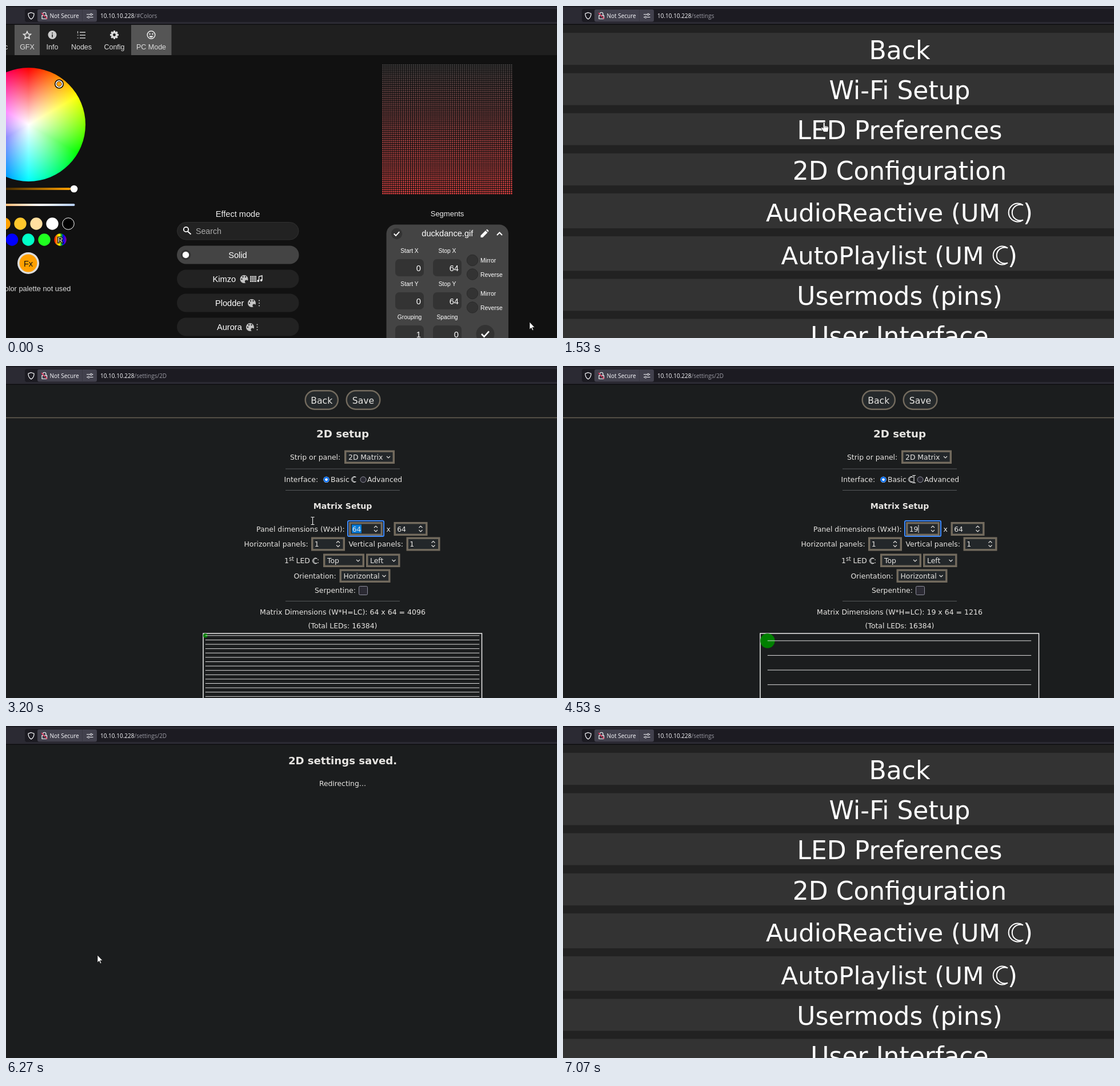
Animation, 964 px wide and 581 px high, one loop 7.34 s. Source, as an HTML page:

```html
<!DOCTYPE html>
<html lang="en">
<head>
<meta charset="utf-8">
<title>Matrix settings</title>
<style>
html, body { margin: 0; width: 100%; height: 100%; overflow: hidden; background: #111; }
svg { display: block; width: 964px; height: 581px; }
.wheel {
  width: 199px; height: 199px; border-radius: 50%;
  background: radial-gradient(closest-side, #fff, rgba(255,255,255,0)),
              conic-gradient(red, #ff0, lime, cyan, blue, magenta, red);
}
.ui { font-family: "Liberation Sans", Arial, sans-serif; fill: #fff; text-anchor: middle; }
.wide { font-family: "DejaVu Sans", Verdana, sans-serif; fill: #e8e6e3; text-anchor: middle; }
.bar { font-family: "Open Sans", "Noto Sans", sans-serif; fill: #fbfbfe; }
</style>
</head>
<body>
<svg id="stage" viewBox="0 0 964 581"></svg>
<script>
const LOOP = 7340, FRAME = 1000 / 15;
const LEFT = 'text-anchor="start"', RIGHT = 'text-anchor="end"', BOLD = 'font-weight="bold"';
const stage = document.getElementById('stage');

const text = (x, y, s, size, more = '') => `<text x="${x}" y="${y}" font-size="${size}" ${more}>${s}</text>`;
const box = (x, y, w, h, fill, r = 0, more = '') =>
  `<rect x="${x}" y="${y}" width="${w}" height="${h}" rx="${r}" fill="${fill}" ${more}/>`;
const dot = (x, y, r, fill, more = '') => `<circle cx="${x}" cy="${y}" r="${r}" fill="${fill}" ${more}/>`;
const line = (d, color, w = 1, more = '') =>
  `<path d="${d}" fill="none" stroke="${color}" stroke-width="${w}" ${more}/>`;
const shape = (d, fill, more = '') => `<path d="${d}" fill="${fill}" ${more}/>`;
const at = (x, y, s, k = 1) => `<g transform="translate(${x} ${y}) scale(${k})">${s}</g>`;
const range = n => [...Array(n).keys()];
const moon = (x, y, k, w) => at(x, y, line('M25 3A16 16 0 1 0 25 29A14 14 0 1 1 25 3Z', '#fff', w), k);

const defs = `<defs>
  <linearGradient id="glow" gradientUnits="userSpaceOnUse" x1="-42" x2="112"><stop stop-color="#000"/><stop offset="1" stop-color="#ffa000"/></linearGradient>
  <linearGradient id="warm" gradientUnits="userSpaceOnUse" x1="-42" x2="120"><stop stop-color="#ff8a13"/><stop offset=".62" stop-color="#fff"/><stop offset="1" stop-color="#b4cdf5"/></linearGradient>
  <linearGradient id="rainbow"><stop stop-color="#f00"/><stop offset=".25" stop-color="#fa0"/><stop offset=".42" stop-color="#ff0"/><stop offset=".6" stop-color="#0a2"/><stop offset=".75" stop-color="#00f"/><stop offset="1" stop-color="#909"/></linearGradient>
</defs>`;

function browser(path) {
  return `<g class="bar">` +
    box(0, 0, 964, 33, '#2b2a33') + box(0, 0, 964, 2, '#1c1b22') +
    box(33, 5, 950, 23, '#1c1b22', 4) + box(0, 31.5, 964, 1.5, '#0d0d0f') +
    box(55, 6, 104, 21.5, '#42414d', 3) + box(133, 6, 1, 21.5, '#393842') +
    line('M44 11.5L49 13.2Q49.5 19.5 44 23Q38.500 19.500 39 13.200Z', '#fbfbfe', 1.2) +
    line('M64.500 16V14A2.700 2.700 0 0 1 70 14V16M63 16.500H71.500V22.500H63Z', '#fbfbfe', 1.2) +
    line('M62 12L72 22.500', '#e22850', 1.5) +
    line('M141 14.800H147M151 14.800H152.500M141 19.500H142.500M147 19.500H152.500', '#fbfbfe', 1.1) +
    dot(149, 14.8, 1.6, 'none', 'stroke="#fbfbfe"') + dot(144.500, 19.5, 1.6, 'none', 'stroke="#fbfbfe"') +
    text(76.5, 21, 'Not Secure', 10) +
    text(165, 21, `10.10.10.228<tspan fill="#9b9ba4">${path}</tspan>`, 10) + `</g>`;
}

const palette = (x, y) => dot(x, y, 7, '#c4c4c4') +
  [[-4, 0], [-2, -4], [2.5, -4]].map(([a, b]) => dot(x + a, y + b, 1.2, '#222')).join('') + dot(x + 4, y + 4, 2.6, '#222');
const dots = (x, y) => [-4.5, 0, 4.5].map(d => dot(x, y + d, 1, '#ccc')).join('');
const tick = (x, y, k) => at(x, y, line('M-5 0L-1.500 3.500L5 -3.500', '#fff', 2), k);

function topMenu(hover) {
  const gear = range(8).map(i => box(-1.700, -7.5, 3.4, 4, '#ddd', 1, `transform="rotate(${i * 45})"`)).join('');
  return box(0, 33, 964, 53, '#1f1f1f') + box(15, 33, 44, 53, '#555') + box(219, 33, 70.5, 53, '#555') +
    (hover ? box(160.5, 33, 58, 53, '#333') : '') +
    [[0, 'c'], [37, 'GFX'], [81, 'Info'], [132, 'Nodes'], [189.5, 'Config'], [254, 'PC Mode']]
      .map(([x, s]) => text(x, 76, s, 12.5, 'fill="#ddd"')).join('') +
    line('M37 44.500L39 49L43.500 49.400L40 52.500L41 57L37 54.600L33 57L34 52.500L30.500 49.400L35 49Z', '#eee', 1.5) +
    dot(81, 50.5, 7.5, '#ccc') + box(80.200, 46.500, 1.7, 1.8, '#222') + box(80.200, 49.7, 1.7, 5, '#222') +
    line('M129 46H139M129 51H139M129 56H139', '#ccc', 1.7) +
    line('M125.500 44V48M124.500 51H127M124.500 56H127', '#ccc', 1.2) +
    at(189.5, 50.5, gear + dot(0, 0, 5.5, '#ddd') + dot(0, 0, 2.4, hover ? '#333' : '#1f1f1f')) +
    dot(254, 50.5, 6.8, 'none', 'stroke="#eee" stroke-width="1.5"') + dot(251.500, 49, 1.2, '#eee') +
    dot(256.500, 49, 1.2, '#eee') + shape('M250 52.500H258Q254 58 250 52.500Z', '#eee');
}

function colors() {
  const swatches = [[-3, 381, '#ffa000'], [25, 381, '#ffc72c'], [53, 381, '#ffdfa0'], [81, 381, '#fff'],
    [10.5, 409, '#00f'], [39, 409, '#00ffc8'], [67, 409, '#20ff20'], [95, 409, 'url(#rainbow)']];
  return `<foreignObject x="-60.5" y="107.5" width="199" height="199"><div class="wheel"></div></foreignObject>` +
    dot(93, 136.5, 6, '#ffa000', 'stroke="#000" stroke-width="4"') + dot(93, 136.5, 5.6, 'none', 'stroke="#fff" stroke-width="1.8"') +
    box(-42, 318, 155, 4, 'url(#glow)', 2) + dot(119, 320, 6.3, '#fff') + box(-42, 346, 162.5, 4, 'url(#warm)', 2) +
    swatches.map(([x, y, c]) => dot(x, y, 10.7, c)).join('') +
    dot(109, 381, 10.2, '#000', 'stroke="#fff"') +
    text(95, 414, 'R', 13, 'stroke="#000" stroke-width="2.5" paint-order="stroke"') +
    dot(39, 450, 19, '#ddd') + dot(39, 450, 15.5, '#ffa000') + text(39, 455.5, 'Fx', 14.6, 'fill="#111"') +
    text(113.5, 498.5, 'Color palette not used', 12.8, RIGHT + ' fill="#ddd"');
}

function effects() {
  const pill = (y, c) => box(299, y, 213.5, 32, c, 16);
  return text(405.5, 369, 'Effect mode', 14.6, 'fill="#eee"') +
    box(299.5, 378.5, 212.5, 30.5, '#222', 15.5, 'stroke="#303030"') +
    dot(315, 391, 4.2, 'none', 'stroke="#fff" stroke-width="1.8"') + line('M318 394.500L323.500 399.500', '#fff', 2) +
    text(332, 399, 'Search', 14.2, LEFT + ' fill="#aaa"') +
    pill(419.5, '#444') + dot(314.5, 435.5, 9, '#333') + dot(314.5, 435.5, 5.7, '#fff') + text(405.5, 440.5, 'Solid', 14.6) +
    pill(461.5, '#222') + text(361.5, 482.5, 'Kimzo', 14.6, LEFT) + palette(416.5, 478) +
    box(427, 472.5, 11, 10.5, '#ccc') +
    line('M429.700 472.500V483M432.500 472.500V483M435.300 472.500V483M427 476H438M427 479.500H438', '#222', .7) +
    line('M442.500 481V473.500L448 472V480', '#eee', 1.4) + dot(441.2, 481, 1.9, '#eee') + dot(446.600, 480, 1.9, '#eee') +
    pill(503.5, '#222') + text(366, 524.5, 'Plodder', 14.6, LEFT) + palette(430, 520) + dots(443, 520) +
    pill(545.5, '#222') + text(369, 566.5, 'Aurora', 14.6, LEFT) + palette(427, 562) + dots(439.5, 562);
}

function segments() {
  const inputs = [['Start X', 706, 432, 0], ['Stop X', 772, 432, 64], ['Start Y', 706, 490, 0],
    ['Stop Y', 772, 490, 64], ['Grouping', 706, 548, 1], ['Spacing', 772, 548, 0]];
  const check = (y, s) => dot(816, y, 9.7, '#333', 'stroke="#2a2a2a"') + text(830, y + 4, s, 10.4, LEFT);
  const leds = range(64).map(i => {
    const k = i / 63, red = 66 + 165 * k, rest = 64 + 2 * k;
    return line(`M659.500 ${103.3 + i * 3.57}h225.500`, `rgb(${red},${rest},${rest})`, 2.7,
      'stroke-dasharray="0 3.570" stroke-linecap="round"');
  }).join('');
  return leds + text(772, 367.5, 'Segments', 13, 'fill="#eee"') + box(665.5, 382.5, 213.5, 220, '#444', 16) +
    dot(683.5, 398.5, 9.7, '#333') + tick(683.5, 398.5, .95) + text(772.3, 403, 'duckdance.gif', 14.6) +
    shape('M830.500 405V401.500L839 393L842.500 396.500L834 405ZM840 392L841.500 390.700Q842.500 390.500 844.500 393.500L843.500 395.500Z', '#fff') +
    line('M859 401L863.500 396.500L868 401', '#fff', 2) +
    inputs.map(([s, x, y, v]) => text(x, y, s, 10.3) + box(x - 25, y + 11, 50, 30, '#333', 7) +
      text(x + 20, y + 31.5, v, 14.7, RIGHT)).join('') +
    check(445, 'Mirror') + check(469.5, 'Reverse') + check(503, 'Mirror') + check(527.5, 'Reverse') +
    dot(838.5, 574, 16, '#333') + tick(838.5, 574, 1.3);
}

function home(t) {
  return `<g class="ui">` + topMenu(t >= 870) + colors() + effects() + segments() +
    (t >= 130 ? box(952, 95, 1.2, 486, '#444') : '') +
    (t >= 400 ? box(585, 95.5, 1.4, 43, '#4a4a4a') : '') + `</g>`;
}

function settings() {
  const rows = [[47, 56, 'Back'], [117.5, 56, 'Wi-Fi Setup'], [187.5, 56, 'LED Preferences'], [258, 56, '2D Configuration'],
    [328, 61, 'AudioReactive (UM', 355, 780], [403, 60.5, 'AutoPlaylist (UM', 381.5, 753], [477.5, 56, 'Usermods (pins)'], [547.5, 56, 'User Interface']];
  return box(0, 33, 964, 548, '#222') + `<g class="wide" style="fill:#fff">` +
    rows.map(([y, h, s, left, m]) => box(0, y, 964, h, '#333') + (left
      ? text(left, y + 48.5, s, 43.4, LEFT) + moon(m, y + 17.5, 1, 2) + text(m + 25, y + 48.5, ')', 43.4, LEFT)
      : text(589, y + 45.5, s, 44))).join('') + `</g>`;
}

const EDGE = '#736b5e', ink = '#e8e6e3';
const frame = (x, y, w, h) => box(x + 1.7, y + 1.7, w - 3.4, h - 3.4, '#23272a', 0, `stroke="${EDGE}" stroke-width="3.4"`);
const chevron = (x, y, k = 1) => line(`M${x - 3} ${y - 1.5 * k}L${x} ${y + 1.5 * k}L${x + 3} ${y - 1.5 * k}`, ink, 1.1);
const choice = (x, y, w, s) => frame(x, y, w, 23.5) + text(x + 7, y + 16.3, s, 12.4, LEFT) + chevron(x + w - 11, y + 12);
const number = (x, y, v) => frame(x, y, 59, 24) + text(x + 5.7, y + 16.5, v, 12.4, LEFT) +
  chevron(x + 47, y + 8.5, -1) + chevron(x + 47, y + 15.5);

function preview(cols) {
  const pitch = 487 / cols, x = 345 + pitch / 2, y = 468 + pitch / 2;
  const count = Math.min(64, Math.ceil(113 / pitch));
  return box(345, 468, 487.5, 600, 'none', 0, 'stroke="#eee" stroke-width="1.5"') +
    dot(x, y, pitch / 2, '#008000') +
    line(range(count).map(i => `M${x} ${y + i * pitch}H${832 - pitch / 2}`).join(''), '#ddd');
}

function matrix(t) {
  const cols = t < 3530 ? 64 : t < 4130 ? 1 : t < 4600 ? 19 : 192;
  const focus = t >= 3070 && t < 5600, picked = t >= 3130 && t < 3530;
  const caret = focus && !picked && !(t >= 4070 && t < 4130) && t < 5130;
  const label = (x, y, s) => text(x, y, s, 12.4, LEFT);
  const rule = y => line(`M489 ${y}H689`, '#55585a', 1.2);
  return rule(180) + rule(217.5) + rule(411.5) +
    label(486.5, 203, 'Interface:') + dot(560.5, 198.8, 5.2, '#fff') + dot(560.5, 198.8, 3.7, '#fff', 'stroke="#0a6ff0" stroke-width="2.7"') +
    label(568, 203, 'Basic') + moon(604.5, 193.5, .31, 3) +
    dot(625, 198.8, 5, '#2b2a33', 'stroke="#8f8f9d"') + label(632, 203, 'Advanced') +
    text(589, 250, 'Matrix Setup', 14.1, BOLD) +
    label(438, 289.5, 'Panel dimensions (WxH):') +
    (focus ? box(598, 271, 63, 27, '#0d1012', 2, 'stroke="#3f8cff" stroke-width="2"') : '') +
    number(600, 273, cols) + (picked ? box(605, 277.5, 17, 15, '#0078d7') + label(605.7, 289.5, cols) : '') +
    (caret ? box(605.7 + String(cols).length * 7.89, 278, 1, 14, ink) : '') +
    label(665.5, 289.5, 'x') + number(678.5, 273, 64) +
    label(416.5, 316, 'Horizontal panels:') + number(534, 299.5, 1) + label(599.5, 316, 'Vertical panels:') + number(700.5, 299.5, 1) +
    label(487, 345, '1') + text(495, 340.5, 'st', 9.8, LEFT) + label(507.5, 345, 'LED') + moon(536.5, 336, .31, 3) + label(544, 345, ':') +
    choice(555, 328.5, 72, 'Top') + choice(630, 328.5, 59.5, 'Left') +
    label(503.5, 371.5, 'Orientation:') + choice(583.5, 355.5, 89, 'Horizontal') +
    label(540, 397, 'Serpentine:') + box(617.5, 385.5, 15, 15, '#2b2a33', 2, 'stroke="#8f8f9d"') +
    text(589, 435, `Matrix Dimensions (W*H=LC): ${cols} x 64 = ${cols * 64}`, 12.5) +
    text(589, 459, '(Total LEDs: 16384)', 12.4) + preview(cols);
}

function panel(t) {
  const button = (x, w, s) => box(x + 1.2, 43.2, w - 2.4, 32.5, '#25292b', 16.2, `stroke="${EDGE}" stroke-width="2.4"`) +
    text(x + w / 2, 65.7, s, 15.6);
  const ready = t >= 2400;
  return box(0, 33, 964, 548, '#1b1d1e') + `<g class="wide">` + button(522.5, 59.5, 'Back') + button(594.5, 61, 'Save') +
    line('M0 90.500H964', '#676053', 1.5) + text(589, 125, '2D setup', 18.2, BOLD) +
    text(497, 164, 'Strip or panel:', 12.4, LEFT) + choice(592, 147.5, 88, ready ? '2D Matrix' : '1D Strip') +
    (ready ? matrix(t) : '') + `</g>`;
}

const saved = () => box(0, 33, 964, 548, '#1b1d1e') + `<g class="wide">` +
  text(589, 67, '2D settings saved.', 18.1, BOLD) + text(589, 104.5, 'Redirecting…', 12.3) + `</g>`;

const pointers = {
  arrow: shape('M0 0v13l3-2.800 2 4.600 1.900-.8-2-4.500h4.100z', '#fff', 'stroke="#111" stroke-width=".7"'),
  hand: shape('M-1.600 1.500Q0-1.500 1.600 1.500V6L6.500 7.200Q8.500 8 8.200 10.500L6.800 17.500H-.5L-4.800 11.500Q-5-.0 -5 9Q-3.500 8-1.600 10.500Z', '#fff', 'stroke="#111" stroke-width=".9"') +
    line('M1.600 6V9.500M4 7V9.800M6.300 7.500V10', '#111', .7),
  beam: line('M-3-6.500H-.8L0-5.800L.8-6.500H3M0-5.800V5.800M-3 6.500H-.8L0 5.800L.8 6.500H3', '#eee', 1.1)
};

// time, x, y, pointer used from that time on
const route = [
  [0, 916, 553, 'arrow'], [200, 800, 450, 'arrow'], [500, 380, 160, 'arrow'], [700, 205, 62, 'arrow'],
  [800, 169, 37, 'hand'], [1000, 191, 60, 'hand'], [1133, 191, 60, 'hand'], [1533, 456.5, 203, 'hand'],
  [1600, 496, 230, 'hand'], [1933, 548, 288, 'hand'], [2330, 548, 289, 'beam'], [2533, 548, 289, 'beam'],
  [2933, 626.5, 291, 'beam'], [3000, 626.5, 291, 'beam'], [3200, 536.5, 271, 'beam'], [4200, 536.5, 271, 'beam'],
  [4533, 614, 198, 'beam'], [5000, 626.5, 129, 'beam'], [5070, 629, 110, 'arrow'], [5200, 635, 70, 'hand'],
  [5267, 636, 62, 'hand'], [5733, 636, 62, 'hand'], [5930, 470, 180, 'arrow'], [6267, 160, 401, 'arrow'],
  [6533, 56, 567, 'arrow']
];

function pointer(t) {
  if (t >= 6590) return '';
  const i = route.findLastIndex(k => t + 5 >= k[0]);
  const a = route[i], b = route[i + 1] || a;
  const k = Math.min(1, Math.max(0, (t - a[0]) / (b[0] - a[0] || 1)));
  return at(a[1] + (b[1] - a[1]) * k, a[2] + (b[2] - a[2]) * k, pointers[a[3]]);
}

function draw(n) {
  const t = n * FRAME, now = t + 5;
  const path = now < 1000 ? '/#Colors' : now < 2270 || now >= 6870 ? '/settings' : '/settings/2D';
  const page = now < 1270 ? home : now < 2330 ? settings : now < 5930 ? panel : now < 7000 ? saved : settings;
  stage.innerHTML = defs + page(now) + browser(path) + pointer(t);
}

let last = -1;
function tickFrame(time) {
  const n = Math.floor((time % LOOP + 5) / FRAME);
  if (n !== last) draw(last = n);
  requestAnimationFrame(tickFrame);
}
draw(0);
requestAnimationFrame(tickFrame);
</script>
</body>
</html>
```
